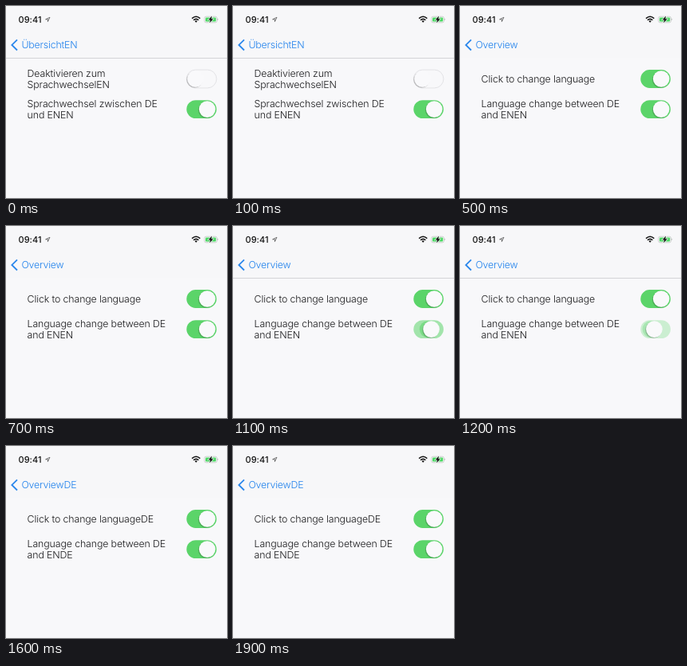
These frames come from a looping animation (277 by 241 pixels, 2000 ms). An HTML page:

```html
<!DOCTYPE html>
<html lang="en">
<head>
<meta charset="utf-8">
<style>
  html, body { margin: 0; width: 100%; height: 100%; overflow: hidden; background: #f8f8fa; }
  svg { display: block; width: 277px; height: 241px; }
  text { font: 300 12.4px Inter, sans-serif; letter-spacing: -.14px; fill: #1b1b1d; text-rendering: geometricPrecision; }
  .title { fill: #1f80ec; letter-spacing: -.2px; }
  .clock { font-size: 11px; font-weight: 500; letter-spacing: .04px; fill: #111; }
  .knob { filter: drop-shadow(-.3px 1.3px .5px #0003); }
</style>
</head>
<body>
<svg viewBox="0 0 277 241">
  <rect width="277" height="65" fill="#f7f7f9"/>
  <text class="clock" x="15.5" y="20.8">09:41</text>
  <path d="M55 14.2 49.6 16.8H52.4V19.6Z" fill="none" stroke="#444" stroke-width=".7" stroke-linejoin="round"/>
  <g fill="none" stroke="#111" stroke-width="1.5">
    <path d="M233.1 15.6Q238.2 11 243.3 15.6M235 17.8Q238.2 14.9 241.4 17.8"/>
    <path d="M236.5 19Q238.2 17.6 239.9 19L238.2 20.7Z" fill="#111" stroke="none"/>
  </g>
  <rect x="248.8" y="13.2" width="15.6" height="7.6" rx="2" fill="none" stroke="#b9bdb9" stroke-width=".7"/>
  <rect x="250" y="14.4" width="13.2" height="5.2" rx="1" fill="#4cd964"/>
  <path d="M265.4 15.6Q267 16.9 265.4 18.2Z" fill="#a5a5a8"/>
  <path d="M258 12.6 253.6 17.5H256L255.2 21.2 259.8 16.3H257.4Z" fill="#111" stroke="#f7f7f9" stroke-width="1.2" paint-order="stroke"/>
  <path d="M14 42.3 7.4 48.9 14 55.5" fill="none" stroke="#2c88ec" stroke-width="1.9"/>
  <g id="screen"></g>
</svg>
<script>
const LOOP = 2000, STEP = 100;
const screen = document.getElementById('screen');
const ON = 1, OFF = 0;

const german = {
  title: 'ÜbersichtEN',
  click: ['Deaktivieren zum', 'SprachwechselEN'],
  change: ['Sprachwechsel zwischen DE', 'und ENEN']
};
const english = suffix => ({
  title: 'Overview' + suffix,
  click: ['Click to change language' + suffix],
  change: ['Language change between DE', 'and EN' + (suffix || 'EN')]
});

// Position of the lower switch while it is turned off and on again.
function lowerSwitch(ms) {
  if (ms < 1100 || ms >= 1600) return ON;
  if (ms >= 1500) return .7;
  return [.75, .4, .1, OFF][(ms - 1100) / STEP];
}

function label(lines, centre) {
  const top = centre + 4.3 - (lines.length - 1) * 7.3;
  return lines.map((line, i) => `<text x="26.6" y="${top + i * 14.6}">${line}</text>`).join('');
}

function toggle(y, value, border) {
  const x = 237.6 + 14.6 * value;
  const moving = value > 0 && value < 1;
  const green = value === 1 ? 1 : value * .72;
  const track = 'x="226.3" width="37.6" height="22.9" rx="11.45"';
  const trail = moving
    ? `<circle cx="${x - 4.5}" cy="${y}" r="10.3" fill="#5bd469" opacity="${value * .75}"/>` : '';
  return `
    <rect ${track} y="${y - 11.45}" fill="#5bd469" fill-opacity="${green}"
      stroke="#e3e3e6" stroke-width="${border ? 1 : 0}"/>
    ${trail}
    <circle class="knob" cx="${x}" cy="${y}" r="10.3" fill="#f9f9fb"/>`;
}

function draw(ms) {
  const words = ms < 400 ? german : english(ms < 1600 ? '' : 'DE');
  const line = ms < 400 || (ms >= 1100 && ms < 1400);
  screen.innerHTML = `
    ${line ? '<path d="M0 65.5H277" stroke="#d3d3d7"/>' : ''}
    <text class="title" x="19.4" y="53">${words.title}</text>
    ${label(words.click, 91.5)}
    ${label(words.change, 129.8)}
    ${toggle(91.5, ms < 400 ? OFF : ON, ms < 400)}
    ${toggle(129.6, lowerSwitch(ms), false)}`;
}

let shown = -1;
function tick() {
  const ms = Math.floor(performance.now() % LOOP / STEP) * STEP;
  if (ms !== shown) draw(shown = ms);
  requestAnimationFrame(tick);
}
tick();
</script>
</body>
</html>
```
